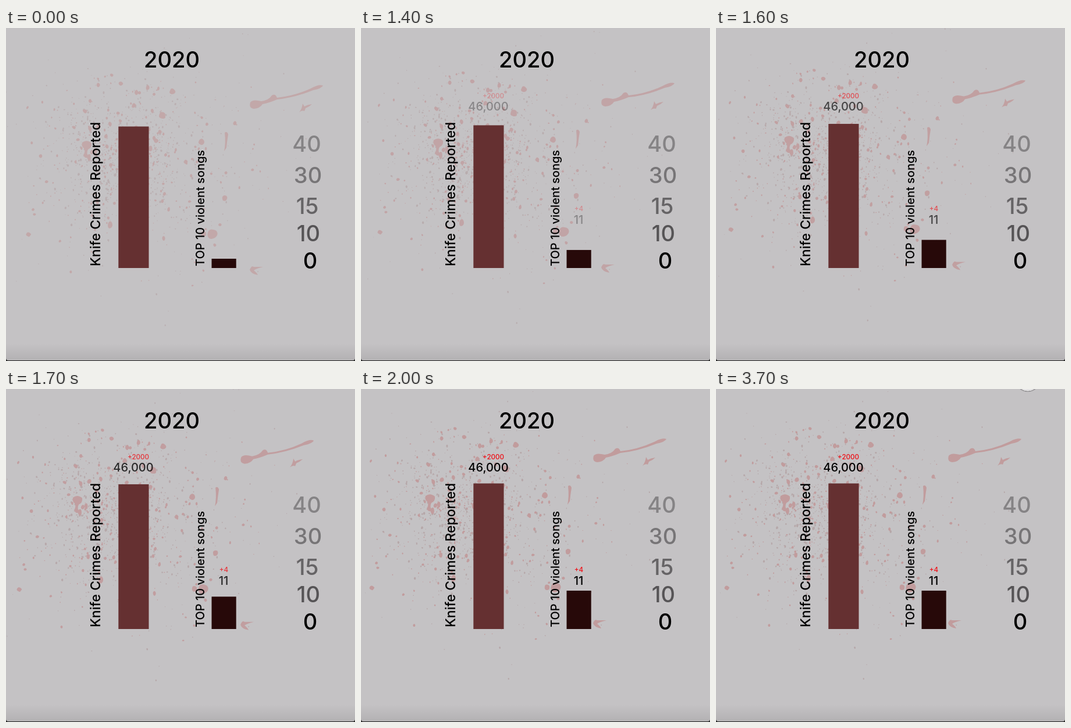
An HTML page for the animation above (3.8 s loop, 600 by 573 pixels).

```html
<!DOCTYPE html>
<html lang="en">
<head>
<meta charset="utf-8">
<title>Knife crime chart</title>
<style>
  html, body { margin: 0; width: 100%; height: 100%; overflow: hidden; background: #222; }
  svg { display: block; width: 100vw; height: 100vh; }
  text { font: 450 38px Inter, sans-serif; }
  .scale, .value, .year { text-anchor: middle; }
  .value text { font-size: 20px; }
  .value .gain { font-size: 11.6px; fill: #f00b12; }
</style>
</head>
<body>
<svg viewBox="0 0 600 573">
  <defs>
    <linearGradient id="shade" x1="0" y1="0" x2="0" y2="1">
      <stop offset="0" stop-color="#000" stop-opacity="0"/>
      <stop offset="1" stop-color="#000" stop-opacity=".09"/>
    </linearGradient>
    <clipPath id="panel"><path d="M0 0H600V568Q600 572 596 572H4Q0 572 0 568Z"/></clipPath>
    <radialGradient id="knob">
      <stop offset=".9" stop-color="#e4e3e4"/>
      <stop offset=".92" stop-color="#848284"/>
      <stop offset="1" stop-color="#848284" stop-opacity="0"/>
    </radialGradient>
  </defs>
  <g clip-path="url(#panel)">
    <rect width="600" height="573" fill="#c4c2c4"/>
    <rect y="543" width="600" height="30" fill="url(#shade)"/>
    <g id="splatter">
      <path id="dust" fill="#a07f80"/>
      <path id="drops" fill="#bd6464"/>
      <g fill="#bd6464">
        <path d="M420 128Q424 122 439 126Q452 124 457 116Q463 112 466 120Q496 117 524 104Q538 96 545 99Q543 104 528 107Q496 120 466 123Q452 129 441 131Q437 138 426 139Q417 138 420 128Z"/>
        <path d="M504 145Q509 139 510 130L513 135Q518 132 526 131Q521 136 515 138L513 143Q509 141 504 145Z"/>
        <path d="M131 197Q139 191 147 198Q148 206 141 209Q137 216 143 222Q136 226 133 219Q137 212 134 207Q129 203 131 197Z"/>
        <path d="M376 180Q380 177 382 183Q380 195 379 206L375 212Q378 198 376 180Z"/>
        <path d="M442 411Q430 414 426 417Q432 422 433 425Q421 423 419 416Q422 408 426 411Z"/>
      </g>
    </g>
    <rect id="crimeBar" x="193.3" width="52.2" fill="#653031"/>
    <rect id="songBar" x="353.5" width="42.2" fill="#270909"/>
    <text class="year" x="285" y="68">2020</text>
    <text transform="translate(162 410) rotate(-90)" style="font-size:23px">Knife Crimes Reported</text>
    <text transform="translate(341 410) rotate(-90)" style="font-size:20px">TOP 10 violent songs</text>
    <g class="scale">
      <text x="517" y="213" fill="#858385">40</text>
      <text x="519" y="267" fill="#777577">30</text>
      <text x="518" y="320" fill="#666466">15</text>
      <text x="520" y="367" fill="#565456">10</text>
      <text x="523" y="414">0</text>
    </g>
    <g class="value" id="values">
      <text x="219" y="142">46,000</text>
      <text class="gain" x="227.5" y="121">+2000</text>
      <text x="374" y="336.5">11</text>
      <text class="gain" x="374.5" y="315">+4</text>
    </g>
    <circle id="dot" r="22" fill="url(#knob)"/>
  </g>
</svg>
<script>
const LOOP = 3800, STEP = 100, BASE = 413;
const el = id => document.getElementById(id);
const mix = (a, b, p) => a + (b - a) * p;

let seed = 20;
const random = () => (seed = seed * 16807 % 2147483647) / 2147483647;
const spread = () => random() + random() + random() + random() - 2;

// Closed uneven outline, smoothed through the midpoints of its corners.
function blob(x, y, rx, ry = rx, corners = 5) {
  const points = Array.from({ length: corners }, (_, i) => {
    const angle = i / corners * 2 * Math.PI, r = 0.8 + random() * 0.5;
    return [x + Math.cos(angle) * rx * r, y + Math.sin(angle) * ry * r];
  });
  const middle = i => {
    const a = points[i], b = points[(i + 1) % corners];
    return [(a[0] + b[0]) / 2, (a[1] + b[1]) / 2].map(v => v.toFixed(1));
  };
  const curves = points.map((p, i) => `Q${p.map(v => v.toFixed(1))} ${middle(i)}`);
  return `M${middle(corners - 1)}${curves.join('')}Z`;
}

// A cloud of specks that thins out away from its centre.
function cloud(count, x, y, width, height, small, large) {
  let path = '';
  for (let i = 0; i < count; i++) {
    const size = mix(small, large, random() ** 3);
    path += blob(x + spread() * width, y + spread() * height, size, size * mix(0.7, 1.6, random()));
  }
  return path;
}

const bigDrops = [[269, 151, 6], [286, 109, 5], [355, 355, 8], [340, 355, 5], [39, 355, 4], [336, 196, 5], [376, 292, 5]];
el('drops').setAttribute('d',
  bigDrops.map(([x, y, r]) => blob(x, y, r, r, 9)).join('') +
  cloud(170, 185, 225, 90, 95, 0.9, 4.5) +
  cloud(240, 225, 235, 180, 155, 0.8, 3.6));
el('dust').setAttribute('d',
  cloud(650, 200, 225, 100, 105, 0.7, 2.2) +
  cloud(300, 240, 240, 200, 170, 0.7, 1.8));

function setBar(id, top) {
  el(id).setAttribute('y', top);
  el(id).setAttribute('height', BASE - top);
}

function draw(time) {
  const step = Math.floor(time % LOOP / STEP);
  const grow = Math.min(1, Math.max(0, (step - 12) / 8));
  const p = Math.sin(grow * Math.PI / 2) ** 1.25;
  setBar('crimeBar', mix(169.5, 162.5, p));
  setBar('songBar', mix(397, 347, p));
  el('values').style.opacity = p;
  el('splatter').style.opacity = mix(0.27, 0.4, p);
  el('splatter').setAttribute('transform', `translate(${-20 * p} ${-13 * p})`);

  const slide = (step - 30) / 7;
  el('dot').style.display = slide < 0 ? 'none' : '';
  el('dot').setAttribute('cx', 504 + 32 * Math.sin(slide * Math.PI / 2));
  el('dot').setAttribute('cy', mix(-19.5, -16.5, slide) + 5 * Math.sin(slide * Math.PI));
}

const start = performance.now();
function tick() {
  draw(performance.now() - start);
  requestAnimationFrame(tick);
}
tick();
</script>
</body>
</html>
```
